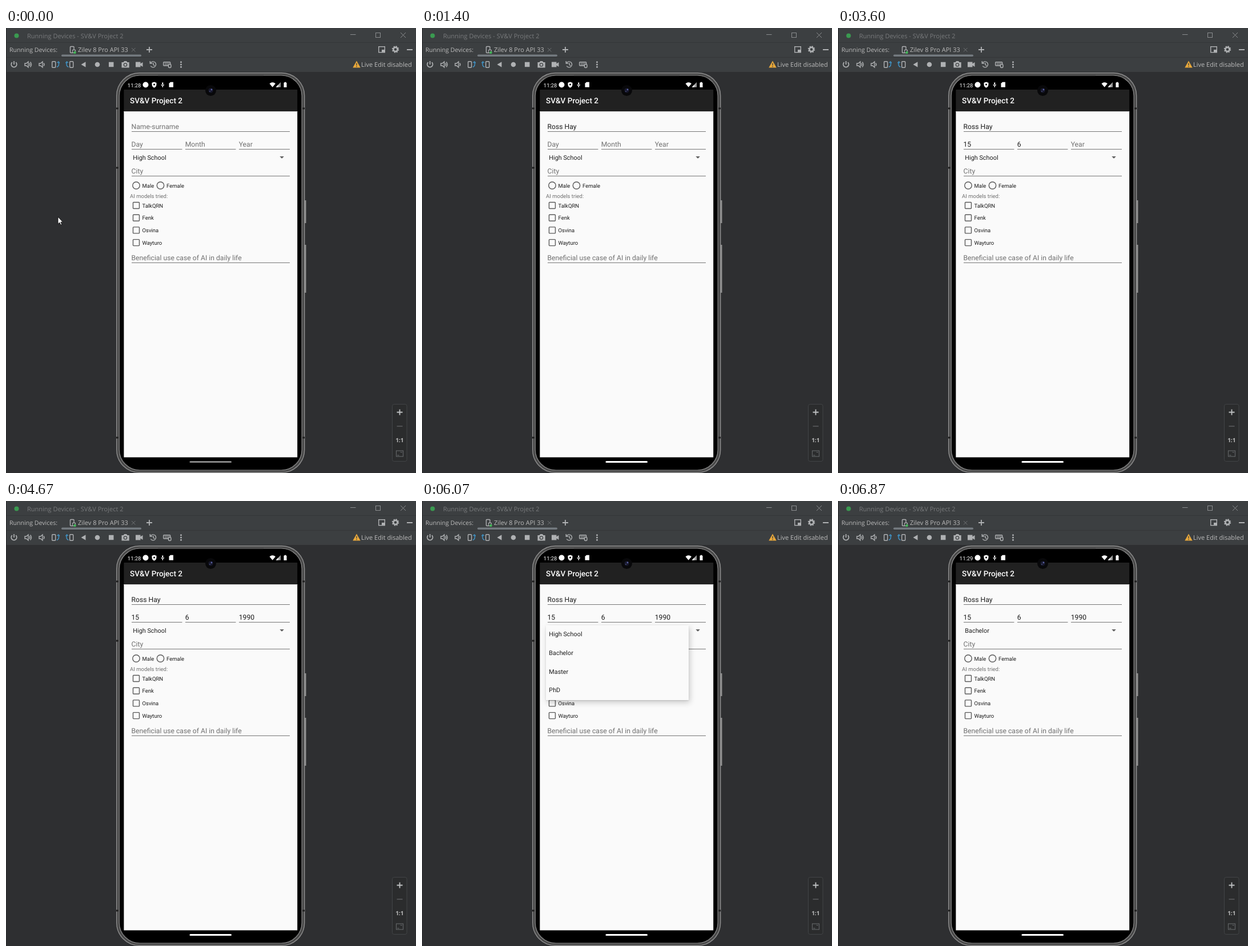
Animation of 718x780 px, one loop 8 s. Source, as an HTML page:

```html
<!DOCTYPE html>
<html lang="en">
<head>
<meta charset="utf-8">
<title>Running Devices</title>
<style>
html, body { margin: 0; width: 100%; height: 100%; overflow: hidden; background: #2e2f31; }
.stage { position: relative; width: 718px; height: 780px; overflow: hidden; }
svg { position: absolute; left: 0; top: 0; }
text, .popup { text-rendering: geometricPrecision; }

.ide { font: 11px "Open Sans", "Noto Sans", sans-serif; fill: #bbb; }
.app { font: 9.5px Roboto, sans-serif; fill: #1c1c1c; }
.app .input { font-size: 12.2px; }
.app .item { font-size: 10.85px; }
.hint { fill: #707070; }
.icons { fill: none; stroke: #afb1b3; stroke-width: 1.4; }
.icons .solid { fill: #afb1b3; stroke: none; }
.box { fill: none; stroke: #5a5a5a; stroke-width: 1.4; }

/* Everything shares one 8 s clock; hard changes use step-end. */
.swap, .cursor, .handle, .popup, .ripple { animation: 8s step-end infinite; }
.swap { --before: 1; --after: 0; }
.before { opacity: var(--before); }
.after { opacity: var(--after); }
.name { animation-name: fill-name; }
.day { animation-name: fill-day; }
.month { animation-name: fill-month; }
.year { animation-name: fill-year; }
.pick { animation-name: fill-pick; }
@keyframes fill-name { 17.5%, 100% { --before: 0; --after: 1; } }
@keyframes fill-day { 31.625%, 100% { --before: 0; --after: 1; } }
@keyframes fill-month { 45%, 100% { --before: 0; --after: 1; } }
@keyframes fill-year { 58.375%, 100% { --before: 0; --after: 1; } }
@keyframes fill-pick { 82.5%, 100% { --before: 0; --after: 1; } }

.cursor { animation-name: leave; }
@keyframes leave {
  0% { transform: translate(91px, 331px); }
  .875% { transform: translate(90px, 331px); }
  1.69% { transform: translate(88px, 332px); }
  2.5% { transform: translate(84px, 333px); }
  3.375% { transform: translate(77px, 336px); }
  4.19% { transform: translate(68px, 340px); }
  5% { transform: translate(55px, 345px); }
  5.875% { transform: translate(39px, 351px); }
  6.625% { transform: translate(6px, 358px); }
  7.5%, 100% { transform: translate(-20px, 362px); }
}

.handle { animation-name: brighten; }
@keyframes brighten {
  0% { fill: #858585; }
  1.69% { fill: #929292; }
  3.375% { fill: #a0a0a0; }
  5% { fill: #b0b0b0; }
  6.625% { fill: #c4c4c4; }
  7.5% { fill: #d4d4d4; }
  10% { fill: #efefef; }
  13.375%, 100% { fill: #fff; }
}

.ripple { transform-origin: 483px 227px; opacity: 0; animation-name: ripple; }
@keyframes ripple {
  0% { opacity: 0; transform: scale(.6); }
  69.125% { opacity: .6; transform: scale(.7); }
  70% { opacity: 1; transform: none; animation-timing-function: steps(7, end); }
  75.875%, 100% { opacity: 0; transform: none; }
}

/* Flex keeps the list centred in the window while it opens. */
.popup {
  position: absolute; left: 217px; top: 218px; width: 250px; height: 131px;
  display: flex; align-items: center; overflow: hidden;
  background: #fafafa; color: #1c1c1c;
  font: 10.85px/32.7px Roboto, sans-serif;
  box-shadow: 2px 4px 10px rgba(0, 0, 0, .2), 0 1px 2px rgba(0, 0, 0, .12);
  opacity: 0; animation-name: popup;
}
.popup div { flex: none; padding-left: 5.3px; }
.popup span { display: block; white-space: nowrap; }
@keyframes popup {
  0% { opacity: 0; height: 99px; transform: translateX(3px); }
  70% { opacity: 1; height: 99px; transform: translateX(3px); }
  70.875% { opacity: 1; height: 124px; transform: translateX(.7px); }
  71.69% { opacity: 1; height: 130px; transform: none; }
  72.5% { opacity: 1; height: 131px; transform: none; }
  82.5% { opacity: .8; height: 131px; transform: none; }
  83.6% { opacity: .5; height: 131px; transform: none; }
  84.75% { opacity: .2; height: 131px; transform: none; }
  85.875%, 100% { opacity: 0; height: 131px; transform: none; }
}
</style>
</head>
<body>
<div class="stage">
<svg width="718" height="780" viewBox="0 0 718 780">
  <defs>
    <radialGradient id="press" cx=".42" cy=".48" r=".58">
      <stop offset="0" stop-opacity=".32"/>
      <stop offset=".6" stop-opacity=".22"/>
      <stop offset="1" stop-opacity=".08"/>
    </radialGradient>
    <rect id="check" class="box" x="222.5" y="-5.5" width="11" height="11" rx="1"/>
    <path id="speaker" class="solid" d="M-5-2h2.6L1-5V5L-2.400 2H-5Z"/>
  </defs>

  <!-- Window -->
  <rect width="718" height="780" fill="#2e2f31"/>
  <rect width="718" height="77" fill="#3c3f41"/>
  <path d="M0 25.500H718M0 51.500H718" stroke="#343638"/>
  <path d="M.5 0V780" stroke="#292a2b"/>
  <circle cx="18.500" cy="13.500" r="4" fill="#3a9a50"/>
  <rect x="97" y="46.500" width="140" height="3.500" rx="1.700" fill="#747a80"/>
  <g class="ide">
    <text x="37" y="17.500" fill="#787a7c">Running Devices - SV&amp;V Project 2</text>
    <text x="6" y="42" style="font-size:10.6px">Running Devices:</text>
    <text x="126" y="42">Zilev 8 Pro API 33</text>
    <text x="622" y="68">Live Edit disabled</text>
  </g>
  <g fill="none" stroke="#8b8d8f">
    <path d="M603 11.500h9.500M691 8l9 9m0-9l-9 9"/>
    <rect x="647.500" y="8.500" width="8" height="8"/>
    <path d="M220 35l6.500 6.500m0-6.500l-6.500 6.500" stroke="#6f7274"/>
  </g>

  <g class="icons">
    <rect x="112.500" y="32.500" width="6.500" height="11" rx="1"/>
    <rect x="116.500" y="38.500" width="5" height="5" fill="#3c3f41" stroke-width="1"/>
    <circle cx="120.500" cy="43" r="2.300" fill="#45b65a" stroke="none"/>
    <path d="M246 38h10M251 33v10M702 38h10" stroke-width="1.800"/>
    <rect x="652.700" y="32.700" width="10.600" height="10"/>
    <path class="solid" d="M658 38h5v5h-5z"/>
    <circle cx="682" cy="37.500" r="3.600" stroke-width="2.600"/>
    <circle cx="682" cy="37.500" r="5.300" stroke-width="1.800" stroke-dasharray="2.200 1.963"/>

    <!-- Toolbar -->
    <path d="M14 58v6M10.800 60.200a4.800 4.800 0 1 0 6.400 0" stroke-width="1.700"/>
    <use href="#speaker" x="38" y="64"/>
    <path d="M41 61.500q2 2.500 0 5M42.500 59.500q4 4.500 0 9"/>
    <use href="#speaker" x="63" y="64"/>
    <path d="M66 61.500q2 2.500 0 5"/>
    <rect x="80.700" y="58.700" width="6" height="10.600" rx="1"/>
    <path d="M89 68.500q5-2 3-8M89.500 61l2.500-2 1.800 2.500" stroke="#3f94c8"/>
    <rect x="111.700" y="58.700" width="6" height="10.600" rx="1"/>
    <path d="M109.500 68.500q-5-2-3-8M104.500 61.500l2-2.500 2.500 2" stroke="#3f94c8"/>
    <path class="solid" d="M131.500 64l8-4.700v9.400z"/>
    <circle class="solid" cx="160" cy="64" r="4.300"/>
    <path class="solid" d="M180 59.700h8.500v8.500H180z"/>
    <path class="solid" d="M202.500 60h3.200l1.400-2h4l1.400 2h3.200v9.500h-13.200z"/>
    <circle cx="209" cy="64.500" r="2.700" stroke="#3c3f41" stroke-width="1.200"/>
    <path class="solid" d="M227 59.500h8.500v3l4-2.500v8l-4-2.500v3H227z"/>
    <path d="M253.500 61a5 5 0 1 1-.2 5.500M252.300 58v4h4M258 61v3.500l2.500 1.500"/>
    <rect x="275.700" y="59.700" width="12" height="6.300" rx="1"/>
    <path d="M278 62h8M278 64.200h6" stroke-dasharray="1.200 1"/>
    <rect x="284.500" y="63.500" width="4.500" height="6" rx="2" fill="#3c3f41"/>
    <g class="solid">
      <circle cx="306.500" cy="59.700" r="1.500"/>
      <circle cx="306.500" cy="64" r="1.500"/>
      <circle cx="306.500" cy="68.300" r="1.500"/>
    </g>
  </g>
  <path d="M614 57.500l6.700 12h-13.400z" fill="#e9a83a"/>
  <path d="M614 61.500v4M614 66.700v1.500" stroke="#3c3f41" stroke-width="1.400"/>

  <!-- Zoom panel -->
  <rect x="676.500" y="659.500" width="25.500" height="100" rx="3" fill="#2b2c2d" stroke="#424446"/>
  <path d="M684.500 673.500h10M689.500 668.500v10" stroke="#c0c2c4" stroke-width="1.800"/>
  <path d="M684.500 698h10" stroke="#5c5e60" stroke-width="1.500"/>
  <text class="ide" x="689.300" y="726" text-anchor="middle" style="font-size:10px;font-weight:700">1:1</text>
  <g fill="none" stroke="#626466" stroke-width="1.200">
    <rect x="683.500" y="741" width="12" height="10"/>
    <path d="M686 748v1h2.500M693 744.500v-1h-2.500"/>
  </g>

  <!-- Phone -->
  <path d="M524 302v40M524 380v84" stroke="#919191" stroke-width="3"/>
  <rect x="193.700" y="78.700" width="329" height="700.600" rx="40" fill="#484848" stroke="#8f8f8f" stroke-width="1.400"/>
  <rect x="198.300" y="83" width="319.800" height="692" rx="36" fill="#000" stroke="#8a8a8a" stroke-width="1.200"/>
  <path d="M266 83.500H451" stroke="#3c3c3c" stroke-width="1.500"/>
  <path d="M193 141h4M193 245h4M193 718h4M519 141h4M519 718h4" stroke="#222" stroke-width="3"/>
  <rect x="206.400" y="108" width="303.800" height="38" fill="#212121"/>
  <rect x="206.400" y="146" width="303.800" height="606.500" fill="#fafafa"/>
  <path d="M206.400 146.500H510.200" stroke="#d8d8d8"/>
  <circle cx="358.500" cy="109.500" r="9.500" fill="#08080a"/>
  <circle cx="358.500" cy="109.500" r="4" fill="#17182c"/>
  <circle cx="360" cy="108" r="1.400" fill="#5a60a0"/>
  <circle cx="357" cy="111" r="1" fill="#42466f"/>
  <rect class="handle" x="321.500" y="759" width="73.500" height="3" rx="1.500"/>

  <g fill="#fff">
    <circle cx="244.500" cy="99.500" r="5"/>
    <path d="M259.500 94.500l4 1.600v3q0 4-4 5.600-4-1.600-4-5.600v-3z"/>
    <circle cx="259.500" cy="99" r="1.500" fill="#000"/>
    <path d="M273.300 95.500h2v4h-2zM271.500 99h1q1.800 3.500 3.600 0h1q-.5 2.500-2.200 2.800V104h-1.200v-2.200q-1.700-.3-2.200-2.800z"/>
    <path d="M288 94.700h5v9h-7.500v-6.500z"/>
    <path d="M461.500 97.500q5.200-4.500 10.400 0l-5.200 6.200z"/>
    <path d="M481 95v8.700h-8.500z" fill="#a0a0a0"/>
    <path d="M477 99.300v4.400h-4.500z"/>
    <path d="M486.500 95.700h1.300v-1h2.400v1h1.300v8.300h-5z"/>
  </g>

  <!-- Form -->
  <g class="app">
    <g class="swap pick">
      <text class="before" x="212.800" y="103.500" fill="#fff">11:28</text>
      <text class="after" x="212.800" y="103.500" fill="#fff">11:29</text>
    </g>
    <text x="217" y="132" fill="#fff" style="font-size:13.56px;font-weight:500">SV&amp;V Project 2</text>
    <path d="M220 181.500H497M220 212.500H308.500M314 212.500H402.500M408 212.500H497M220 259.500H497M220 411.500H497" stroke="#777"/>

    <g class="input">
      <g class="swap name">
        <text class="hint before" x="219.500" y="176.700">Name-surname</text>
        <text class="after" x="219.500" y="176.700">Ross Hay</text>
      </g>
      <g class="swap day">
        <text class="hint before" x="219.500" y="207.700">Day</text>
        <text class="after" x="219.500" y="207.700">15</text>
      </g>
      <g class="swap month">
        <text class="hint before" x="313.700" y="207.700">Month</text>
        <text class="after" x="313.700" y="207.700">6</text>
      </g>
      <g class="swap year">
        <text class="hint before" x="407.700" y="207.700">Year</text>
        <text class="after" x="407.700" y="207.700">1990</text>
      </g>
      <text class="hint" x="219.500" y="254.700">City</text>
      <text class="hint" x="219.500" y="407">Beneficial use case of AI in daily life</text>
    </g>

    <g class="swap pick item">
      <text class="before" x="222.300" y="230.500">High School</text>
      <text class="after" x="222.300" y="230.500">Bachelor</text>
    </g>
    <circle class="ripple" cx="483" cy="227" r="13" fill="url(#press)"/>
    <path d="M479.300 225h7.600l-3.800 3.800z" fill="#5e5e5e"/>

    <circle class="box" cx="228" cy="276" r="6.200"/>
    <circle class="box" cx="270.500" cy="276" r="6.200"/>
    <text x="238.500" y="279.700">Male</text>
    <text x="281" y="279.700">Female</text>
    <text class="hint" x="217" y="297.500">AI models tried:</text>
    <use href="#check" y="311"/>
    <use href="#check" y="332.700"/>
    <use href="#check" y="354.400"/>
    <use href="#check" y="376.100"/>
    <text x="238.500" y="314.500">TalkQRN</text>
    <text x="238.500" y="336.200">Fenk</text>
    <text x="238.500" y="357.900">Osvina</text>
    <text x="238.500" y="379.600">Wayturo</text>
  </g>

  <path class="cursor" d="M0 0V12.500L2.800 9.900 4.800 14.300 6.800 13.400 4.900 9.200H8.600Z" fill="#fff" stroke="#000" stroke-width=".8"/>
</svg>
<div class="popup"><div>
  <span>High School</span>
  <span>Bachelor</span>
  <span>Master</span>
  <span>PhD</span>
</div></div>
</div>
</body>
</html>
```
